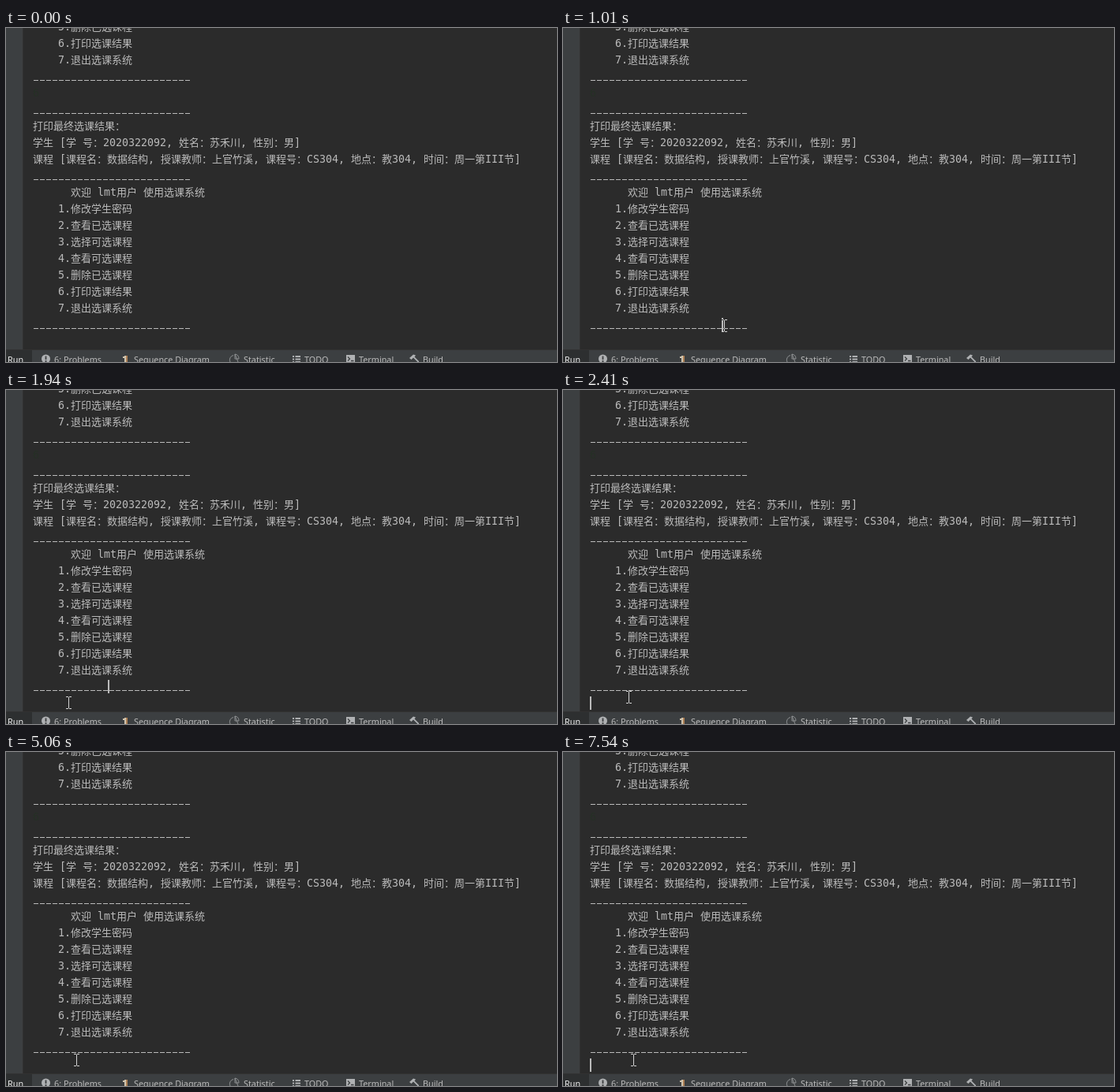
An HTML page for the animation above (8000 ms loop, 698 by 424 pixels).

```html
<!DOCTYPE html>
<html lang="zh-CN">
<head>
<meta charset="utf-8">
<title>Console</title>
<style>
  html, body { margin: 0; width: 100%; height: 100%; overflow: hidden; background: #2b2b2b; }
  svg { display: block; width: 698px; height: 424px; }
  text { white-space: pre; fill: #bbb; }
  .mono { font: 13.3px "DejaVu Sans Mono", "Noto Sans Mono", monospace; }
  .cjk { font: 13px "Noto Sans CJK SC", "Noto Sans CJK", sans-serif; }
  .tab { font: 10.8px "Noto Sans", "Open Sans", sans-serif; }
  .tab:first-child { fill: #eee; }
  .rule { stroke: #bbb; stroke-dasharray: 6 2; }
  #pointer { fill: none; stroke: #fff; mix-blend-mode: difference; }
</style>
</head>
<body>
<svg viewBox="0 0 698 424">
  <rect width="698" height="424" fill="#2b2b2b"/>
  <rect width="22" height="424" fill="#3c3f41"/>
  <rect x="21" width="1" height="408" fill="#323232"/>
  <g id="console"></g>

  <rect y="408" width="698" height="16" fill="#3c3f41"/>
  <rect y="408" width="698" height="1" fill="#323232"/>
  <rect y="409" width="33" height="15" fill="#2d2f30"/>
  <g id="tabs"></g>
  <g fill="#afb1b3">
    <circle cx="50.5" cy="420" r="5.5"/>
    <path d="M50.5 416.5v4.500m0 1v2" stroke="#3c3f41" stroke-width="1.800"/>
    <path d="M148 417h2v-1h2v8h-2v-5h-2z" fill="#d0c4ae"/>
    <path d="M152 416h2v8h-2z" fill="#ad8055"/>
    <path d="M288 415.5a6 6 0 0 0-4 8.5M290 414a6 6 0 0 1 5 6h-5zl4 10" fill="none" stroke="#8d9092"/>
    <path d="M363 417h2m1.500 0h6.500M363 420.500h2m1.500 0h6.500M363 424h2m1.500 0h6.500" stroke="#afb1b3" stroke-width="2"/>
    <path d="M431 415h11v9h-11z"/>
    <path d="M433 417.5l2.500 2.500-2.500 2.500M437 422.500h3.500" fill="none" stroke="#3c3f41" stroke-width="1.300"/>
    <path d="M511 419l5-4.500 3 1-1.500 2 5.500 5.500v1h-1.500l-5.500-5.500-2.500 2.500z"/>
  </g>

  <rect id="caret" width="2" height="17" fill="#bbb"/>
  <path id="pointer" d="M-3-7.500h3m1 0h3M.5-7v14M-3 7.500h3m1 0h3"/>
</svg>
<script>
const LOOP = 8000, LEFT = 34, LINE = 21, FIRST_BASELINE = 3;
const LATIN = 8, HAN = 13;
const $ = id => document.getElementById(id);

function add(parent, tag, attrs, content) {
  const node = document.createElementNS("http://www.w3.org/2000/svg", tag);
  for (const key in attrs) node.setAttribute(key, attrs[key]);
  if (content) node.textContent = content;
  return parent.appendChild(node);
}

const RULE = "_".repeat(25), INPUT = "6";
const menu = ["修改学生密码", "查看已选课程", "选择可选课程", "查看可选课程",
  "删除已选课程", "打印选课结果", "退出选课系统"].map((label, i) => `    ${i + 1}.${label}`);
const lines = [
  ...menu.slice(4), RULE, INPUT, RULE,
  "打印最终选课结果：",
  "学生 [学 号：2020322092, 姓名：苏禾川, 性别：男]",
  "课程 [课程名：数据结构, 授课教师：上官竹溪, 课程号：CS304, 地点：教304, 时间：周一第III节]",
  RULE, "      欢迎 lmt用户 使用选课系统", ...menu, RULE
];

function drawLine(line, row) {
  const y = FIRST_BASELINE + row * LINE;
  if (line === RULE) {
    add($("console"), "line",
      { class: "rule", x1: LEFT + 1, x2: LEFT + line.length * LATIN, y1: y + .5, y2: y + .5 });
    return;
  }
  let x = LEFT;
  for (const run of line.match(/[ -~]+|[^ -~]+/g)) {
    const latin = /^[ -~]/.test(run);
    const cell = latin ? LATIN : HAN;
    const indent = run.length - run.trimStart().length;
    const node = add($("console"), "text",
      { class: latin ? "mono" : "cjk", x: x + indent * cell, y }, run.trim());
    if (line === INPUT) node.style.fill = "#263026";
    x += run.length * cell;
  }
}
lines.forEach(drawLine);

const tabs = { Run: 2, "6: Problems": 61, "Sequence Diagram": 162, Statistic: 301,
  TODO: 378, Terminal: 447, Build: 528 };
for (const label in tabs) add($("tabs"), "text", { class: "tab", x: tabs[label], y: 425 }, label);

// The pointer moves in even steps between key points: step, x, y.
const MOVE_START = 140, STEP = 77.3;
const path = [
  [0, 657, 421], [3, 415, 398], [7, 224, 384], [9, 192, 366], [10, 207, 376], [12, 201, 379],
  [16, 139, 389], [17, 124, 396], [19, 141, 385], [20, 132, 383],
  [23, 79, 397], [24, 75, 400], [29, 83, 390], [31, 89, 391]
];

function pointerAt(t) {
  const step = Math.floor((t - MOVE_START) / STEP);
  if (step < 0) return null;
  const next = path.findIndex(key => key[0] > step);
  if (next < 0) return path[path.length - 1].slice(1);
  const [s0, x0, y0] = path[next - 1], [s1, x1, y1] = path[next];
  const k = (step - s0) / (s1 - s0);
  return [Math.round(x0 + (x1 - x0) * k), Math.round(y0 + (y1 - y0) * k)];
}

// Each click puts the caret somewhere; from "off" on it blinks.
const BLINK = 1005, DARK = 465;
const clicks = [
  { at: 1010, off: 1460, x: 201, y: 368 },
  { at: 1700, off: 2250, x: 129, y: 368 },
  { at: 2330, off: 3040, x: LEFT, y: 389 }
];

function caretAt(t) {
  const click = clicks.filter(c => c.at <= t).pop();
  if (!click) return null;
  const dark = t >= click.off && (t - click.off) % BLINK < DARK;
  return dark ? null : [click.x, click.y];
}

function place(node, point) {
  node.style.display = point ? "" : "none";
  if (point) node.setAttribute("transform", `translate(${point})`);
}

function render(t) {
  place($("pointer"), pointerAt(t));
  place($("caret"), caretAt(t));
}

const start = performance.now();
function tick() {
  render((performance.now() - start) % LOOP);
  requestAnimationFrame(tick);
}
tick();
</script>
</body>
</html>
```
